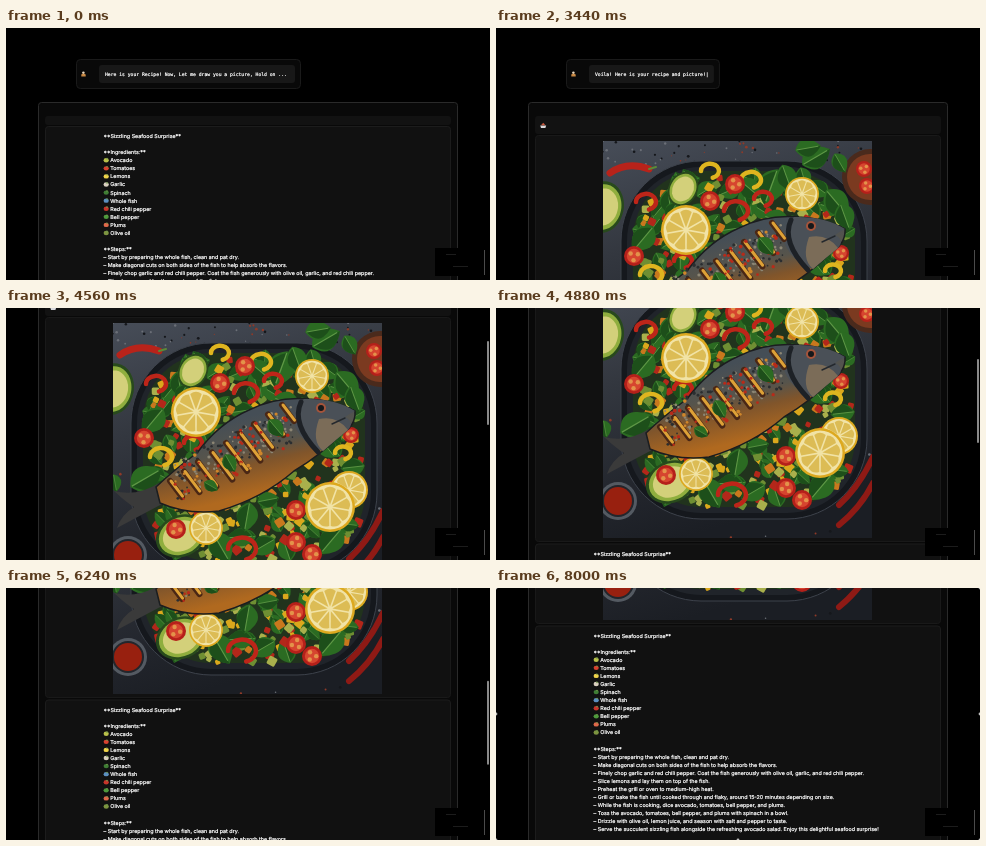
An HTML page that plays this animation: 484 by 252 pixels, repeating every 8080 ms.

```html
<!DOCTYPE html>
<html lang="en">
<head>
<meta charset="utf-8">
<title>Recipe chat</title>
<style>
html, body { margin: 0; width: 100%; height: 100%; overflow: hidden; background: #000; }
svg { display: block; width: 484px; height: 252px; }
text { fill: #fff; stroke: #fff; stroke-width: .22px; text-rendering: geometricPrecision; white-space: pre; }
.mono { font: 4.73px "DejaVu Sans Mono", monospace; }
.body { font: 5.36px Inter, sans-serif; }
</style>
</head>
<body>
<svg id="stage" viewBox="0 0 484 252">
  <defs>
    <clipPath id="frame"><rect width="269" height="269"/></clipPath>
    <linearGradient id="slate" x2=".3" y2="1">
      <stop stop-color="#474d58"/><stop offset=".4" stop-color="#33373f"/><stop offset=".8" stop-color="#22252c"/><stop offset="1" stop-color="#1b1e24"/>
    </linearGradient>
    <linearGradient id="skin" x1=".35" y1=".2" x2=".6" y2=".8">
      <stop stop-color="#454e56"/><stop offset=".4" stop-color="#56544c"/><stop offset=".62" stop-color="#80552b"/><stop offset="1" stop-color="#b0691f"/>
    </linearGradient>
  </defs>
  <g id="page">
    <rect id="bubble" x="70.5" y="31.5" height="29" rx="4" fill="#090909" stroke="#1a1a1a"/>
    <rect id="inner" x="93" y="37" height="18" rx="3" fill="#181818"/>
    <g id="cook">
      <path d="M75.3 48.6v-2l2-1.6 2.4 1.6v2z" fill="#c98a45"/>
      <circle cx="77.4" cy="44.6" r="1.2" fill="#e8d8c0"/>
    </g>
    <text id="message" class="mono" x="99" y="47.6"></text>
    <rect x="32.5" y="74.5" width="419" height="640" rx="3" fill="#090909" stroke="#2a2a2a"/>
    <rect id="header" x="39" y="88" width="406" rx="3" fill="#121212"/>
    <g id="pot">
      <path d="M44.2 97.5h6l-.8 2.5h-4.4z" fill="#d9d9dc"/>
      <path d="M45 97.3l2.2-2.6 2.2 2.6z" fill="#c9573b"/>
    </g>
    <rect id="imageBox" x="39.5" y="107.5" width="405" height="278" rx="3" fill="#111" stroke="#191919"/>
    <g id="photo" transform="translate(107 113)" clip-path="url(#frame)"></g>
    <g id="recipe">
      <rect x="39.5" y="-9.5" width="405" height="300" rx="3" fill="#111" stroke="#1c1c1c"/>
      <g id="lines"></g>
    </g>
  </g>
  <rect id="thumb" x="481" width="2" height="84" rx="1" fill="#8a8a8a"/>
  <g id="preview">
    <rect x="429" y="220" width="50" height="28" fill="#000"/>
    <path d="M478.5 222v25" stroke="#4a4a4a"/>
    <path d="M440 226.5h10M447 238.5h15" stroke="#1c1c1c"/>
  </g>
  <g id="handles" fill="#bbb"></g>
</svg>
<script>
const $ = id => document.getElementById(id);

function add(parent, tag, attrs, text) {
  const el = document.createElementNS('http://www.w3.org/2000/svg', tag);
  for (const key in attrs) el.setAttribute(key, attrs[key]);
  if (text) el.textContent = text;
  parent.append(el);
  return el;
}

// Recipe text
const ingredients = [
  ['Avocado', '#b9c04a'], ['Tomatoes', '#d8412f'], ['Lemons', '#f0d34a'], ['Garlic', '#d9cfbf'],
  ['Spinach', '#3f7d35'], ['Whole fish', '#5b8fc0'], ['Red chili pepper', '#c8342a'],
  ['Bell pepper', '#4f9a3c'], ['Plums', '#e0694a'], ['Olive oil', '#7d9440']
];
const steps = [
  'Start by preparing the whole fish, clean and pat dry.',
  'Make diagonal cuts on both sides of the fish to help absorb the flavors.',
  'Finely chop garlic and red chili pepper. Coat the fish generously with olive oil, garlic, and red chili pepper.',
  'Slice lemons and lay them on top of the fish.',
  'Preheat the grill or oven to medium-high heat.',
  'Grill or bake the fish until cooked through and flaky, around 15-20 minutes depending on size.',
  'While the fish is cooking, dice avocado, tomatoes, bell pepper, and plums.',
  'Toss the avocado, tomatoes, bell pepper, and plums with spinach in a bowl.',
  'Drizzle with olive oil, lemon juice, and season with salt and pepper to taste.',
  'Serve the succulent sizzling fish alongside the refreshing avocado salad. Enjoy this delightful seafood surprise!'
];
const pitch = 8.083;
const line = (row, text, x = 97.5) => add($('lines'), 'text', { class: 'body', x, y: 2 + row * pitch }, text);
line(0, '**Sizzling Seafood Surprise**');
line(2, '**Ingredients:**');
ingredients.forEach(([name, fill], i) => {
  const cy = (i + 3) * pitch;
  add($('lines'), 'ellipse', { cx: 100.2, cy, rx: 2.6, ry: 2.2, fill });
  add($('lines'), 'circle', { cx: 101, cy: cy - 1.6, r: .8, fill: '#6f9a4a' });
  line(i + 3, name, 104.3);
});
line(14, '**Steps:**');
steps.forEach((text, i) => line(i + 15, '– ' + text));

// Dish picture, in its own 269 x 269 space
let seed = 11;
const rand = () => (seed = seed * 16807 % 2147483647) / 2147483647;
const photo = $('photo');
const disc = (cx, cy, r, fill) => add(photo, 'circle', { cx, cy, r, fill });
const path = (d, fill, more) => add(photo, 'path', { d, fill, ...more });
const stroke = (d, color, width) =>
  path(d, 'none', { stroke: color, 'stroke-width': width, 'stroke-linecap': 'round' });

function leaf(x, y, size, turn) {
  const transform = `translate(${x} ${y}) rotate(${turn}) scale(${size / 10})`;
  path('M-10 0Q-5-10 3-6Q7-4 10 0Q7 4 3 6Q-5 10-10 0', '#2b6b22', { transform });
  path('M-9 0Q-3 9 3 6Q7 4 10 0Z', '#1d4f1a', { transform });
  path('M-9 0H8', 'none', { transform, stroke: '#5f9846', 'stroke-width': .7 });
}
function lemon(x, y, r) {
  disc(x, y, r, '#dda91f');
  disc(x, y, r * .9, '#f1e3a6');
  for (let i = 0; i < 9; i++) {
    path(`M0 ${-r * .1}L${r * .23} ${-r * .72}Q0 ${-r * .9} ${-r * .23} ${-r * .72}Z`, '#dcbc55',
      { transform: `translate(${x} ${y}) rotate(${i * 40})` });
  }
}
function tomato(x, y, r) {
  disc(x, y, r, '#b5201a');
  disc(x, y, r * .72, '#d6452f');
  for (let i = 0; i < 3; i++) {
    const a = i * 2.1 + x;
    disc(x + Math.cos(a) * r * .42, y + Math.sin(a) * r * .42, r * .22, '#e3934a');
  }
}
function avocado(x, y, r, turn) {
  [[1, '#284a1c'], [.88, '#8fae3e'], [.72, '#d3d07a']].forEach(([k, fill]) =>
    add(photo, 'ellipse', { rx: r * k, ry: r * .8 * k, fill, transform: `translate(${x} ${y}) rotate(${turn})` }));
}
const ring = (x, y, r, color) => stroke(`M${x - r} ${y}a${r} ${r * .8} 0 1 1 ${r * 1.3} ${r * .75}`, color, 4.5);

add(photo, 'rect', { width: 269, height: 269, fill: 'url(#slate)' });
for (let i = 0; i < 90; i++) {
  disc(rand() * 269, rand() * (i < 50 ? 24 : 269), .5 + rand() * .9, ['#15171b', '#6b6f77', '#8f3a28'][i % 3]);
}
add(photo, 'rect', { x: 18, y: 20, width: 246, height: 230, rx: 80, fill: '#15181d', stroke: '#3d424b' });
add(photo, 'rect', { x: 24, y: 26, width: 234, height: 218, rx: 74, fill: '#20242a' });
add(photo, 'rect', { x: 30, y: 30, width: 222, height: 208, rx: 68, fill: '#21331d' });
avocado(0, 66, 26, 100);
disc(267, 36, 28, '#4a2a1c');
disc(267, 36, 23, '#7b3a20');
tomato(261, 28, 8);
tomato(264, 45, 8);
disc(15, 232, 19, '#545a62');
disc(15, 232, 16, '#23262c');
disc(15, 232, 14, '#98200f');
stroke('M7 32Q24 20 46 28', '#b8231a', 7);
stroke('M46 28l7-2', '#5c8a37', 2);
stroke('M270 188Q256 218 236 236', '#8f1a15', 6);
stroke('M270 214Q258 238 236 256', '#8f1a15', 6);
[[213, 16, 16, -30], [205, 7, 13, -10], [237, 22, 11, 60], [2, 160, 9, 80]].forEach(a => leaf(...a));

// Salad fills a superellipse inside the tray
for (let i = 0; i < 620; i++) {
  const x = rand() * 2 - 1, y = rand() * 2 - 1;
  const turn = rand() * 90, size = 5 + rand() * 4;
  if (x ** 4 + y ** 4 > .75) continue;
  const px = 141 + x * 114, py = 134 + y * 108;
  if (i % 4 == 0) leaf(px, py, size * 1.5, turn * 4);
  else add(photo, 'rect', {
    width: size, height: size, rx: 1.5, fill: ['#dba81c', '#a9b04c', '#b3271a', '#c9781d', '#6f8f33'][i % 5],
    transform: `translate(${px} ${py}) rotate(${turn})`
  });
}
[[168, 46, 19, 110], [147, 48, 14, 40], [184, 37, 14, 70], [33, 155, 18, -30], [40, 98, 16, 130],
 [108, 224, 17, 60], [134, 194, 15, 100], [218, 218, 17, 130], [234, 62, 17, 50], [242, 76, 14, 70],
 [175, 80, 15, 20], [150, 223, 14, 150]].forEach(a => leaf(...a));
[[148, 39, 10, '#dfb51f'], [107, 30, 9, '#dfb51f'], [48, 134, 11, '#dfb51f'], [230, 130, 8, '#dfb51f'],
 [133, 70, 12, '#bd2519'], [43, 61, 10, '#bd2519'], [160, 58, 9, '#bd2519'], [129, 226, 14, '#bd2519'],
 [80, 120, 9, '#bd2519']].forEach(a => ring(...a));
avocado(80, 48, 18, 120);
avocado(68, 213, 26, -25);
[[132, 43, 10], [107, 60, 10], [31, 115, 10], [183, 187, 10], [183, 219, 10], [199, 231, 10], [238, 112, 8], [63, 206, 10]]
  .forEach(a => tomato(...a));
[[199, 53, 17], [93, 205, 17], [236, 167, 19], [217, 184, 25], [83, 89, 25]].forEach(a => lemon(...a));

// Fish
path('M46 160Q24 174 1 168Q14 180 21 184Q8 192 4 205Q28 192 51 180Z', '#3a3a3a');
path('M43 164Q62 146 84 130Q106 100 136 87Q164 73 196 76Q222 77 242 88Q243 103 228 111Q208 132 181 148Q150 175 106 188Q74 192 47 180Z',
  'url(#skin)', { stroke: '#1b1d1f', 'stroke-width': 1.5 });
for (let i = 0; i < 150; i++) {
  const k = rand();
  disc(62 + k * 118, 157 - k * 58 + (rand() - .5) * 40, .8 + rand() * .9, i % 2 ? '#2b2e30' : '#8d8674');
}
path('M191 76Q222 75 242 88Q236 91 232 94Q242 99 235 107Q226 114 210 128Q187 120 180 98Q180 83 191 76Z', '#4a5057');
path('M206 96Q224 92 235 107Q226 114 210 128Q198 118 206 96Z', '#7b6c58');
stroke('M188 79Q178 101 205 129', '#1d2126', 5);
stroke('M232 95l-13 6', '#24282d', 1.4);
disc(208, 85, 5, '#a5543b');
disc(208, 85, 3, '#15181b');
for (let i = 0; i < 9; i++) {
  const x = 57 + i * 14, y = 158 - i * 9.5, len = 16 + 12 * Math.sin(i / 8 * Math.PI);
  stroke(`M${x} ${y}l${len * .75} ${len}`, '#4a2715', 6);
  stroke(`M${x + 1} ${y}l${len * .72} ${len * .95}`, '#dda137', 3);
}
for (let i = 0; i < 60; i++) {
  const k = rand();
  disc(60 + k * 118, 164 - k * 62 + (rand() - .5) * 44, 1 + rand(), i % 3 ? '#b82a19' : '#cf862b');
}
[[117, 140, 10, 60], [163, 105, 11, 50], [98, 163, 8, 30]].forEach(a => leaf(...a));

for (const [x, y] of [[0, 126], [484, 126], [242, 252], [0, 0], [484, 0], [0, 252], [484, 252]]) {
  add($('handles'), 'circle', { cx: x, cy: y, r: 1.4 });
}

// Timeline
const loop = 8080, imageAt = 3200, typeAt = 670, charTime = 53;
const oldText = 'Here is your Recipe! Now, Let me draw you a picture, Hold on ...';
const newText = 'Voila! Here is your recipe and picture!';
const scrollKeys = [[3700, 0], [4000, 14], [4160, 31], [4880, 152], [5520, 189], [6240, 276], [6720, 322], [7520, 350]];
const clamp = v => Math.max(0, Math.min(1, v));

function scrollAt(t) {
  let y = 0;
  for (let i = 1; i < scrollKeys.length; i++) {
    const [t0, y0] = scrollKeys[i - 1], [t1, y1] = scrollKeys[i];
    y += (y1 - y0) * clamp((t - t0) / (t1 - t0));
  }
  return y;
}
const show = (id, on) => $(id).setAttribute('opacity', +on);

function draw(now) {
  const t = now % loop;
  const typing = t >= typeAt, loaded = t >= imageAt, started = t >= 80;
  const typed = newText.slice(0, Math.max(0, Math.floor((t - typeAt) / charTime)));
  $('message').textContent = typing ? typed + (t < 4080 ? '|' : '') : oldText;
  const right = typing ? 109.5 + (typed.length + 1) * 2.848 : 294.5;
  $('bubble').setAttribute('width', right - 70.5);
  $('inner').setAttribute('width', right - 98.5);

  $('header').setAttribute('height', started ? 18 : 9);
  show('pot', started);
  show('imageBox', started);
  show('photo', loaded);
  show('recipe', loaded ? 1 : 1 - clamp((t - 80) / 560));
  $('recipe').setAttribute('transform', `translate(0 ${loaded ? 397.5 : 108})`);

  const y = scrollAt(t);
  $('page').setAttribute('transform', `translate(0 ${-Math.round(y)})`);
  $('thumb').setAttribute('y', y / 2.98);
  show('thumb', t < 3700 ? 0 : 1 - clamp((t - 7600) / 300));
  show('handles', t >= 7920);
}
const start = performance.now();
function tick() {
  draw(performance.now() - start);
  requestAnimationFrame(tick);
}
tick();
</script>
</body>
</html>
```
